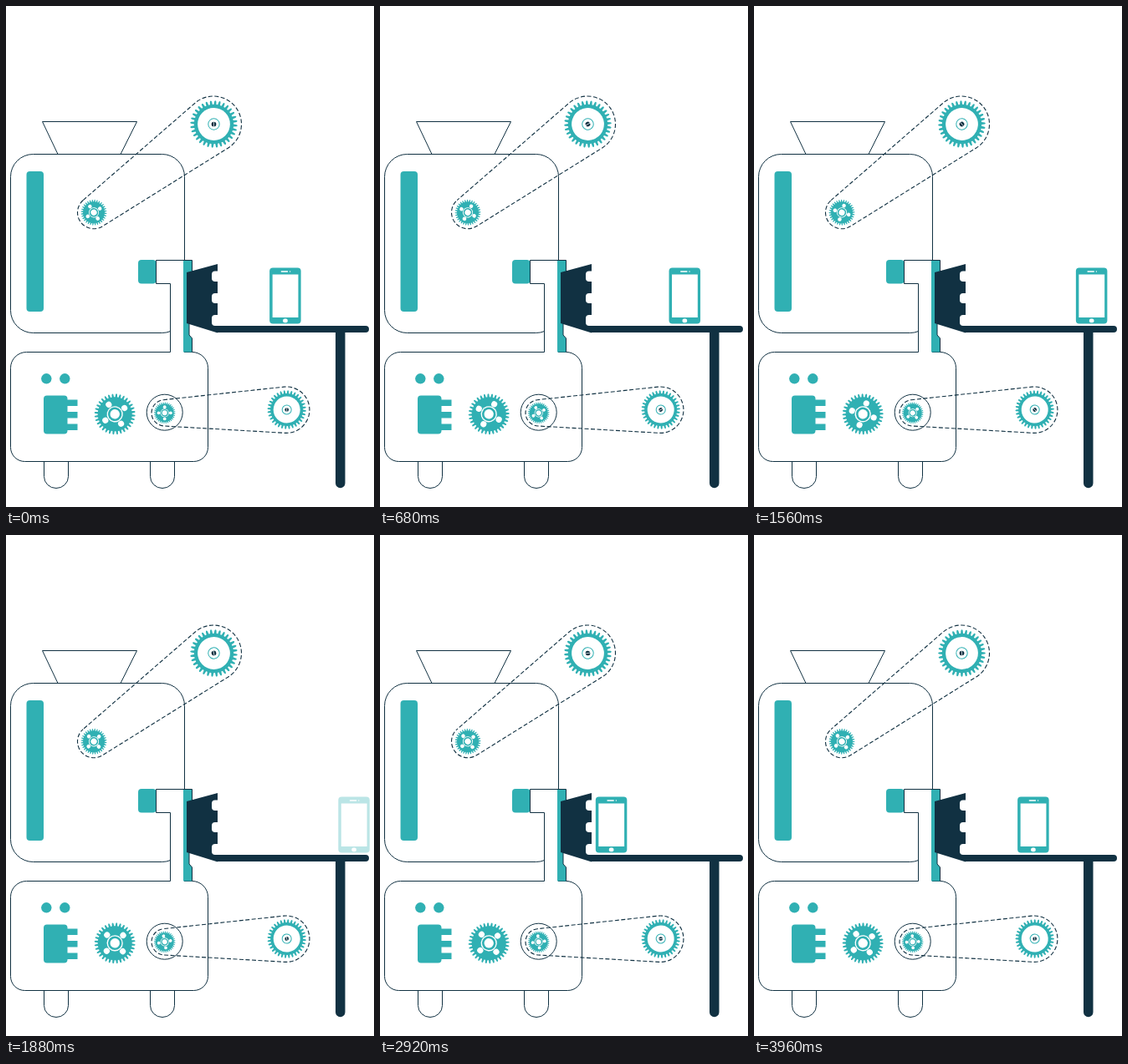
An HTML page for the animation above (4000 ms loop, 440 px wide and 600 px high).

```html
<!DOCTYPE html>
<html lang="en">
<head>
<meta charset="utf-8">
<title>Phone machine</title>
<style>
  html, body { margin: 0; width: 100%; height: 100%; overflow: hidden; background: #fff; }
  svg { display: block; width: 100vw; height: 100vh; }
  .line { fill: #fff; stroke: #113142; stroke-width: 1; }
  .teal { fill: #30b0b3; }
  .navy { fill: #113142; }
  .white { fill: #fff; }
  .belt { fill: none; stroke: #113142; stroke-width: 1.1; stroke-dasharray: 5 2.5; }
  .paper { fill: #fff; stroke: #000; stroke-width: 1.2; }
</style>
</head>
<body>
<svg viewBox="0 0 440 600">
  <defs>
    <clipPath id="exit"><rect x="246" y="300" width="194" height="90"/></clipPath>
    <g id="sheet" class="paper">
      <rect x="-18.5" y="-23.5" width="37" height="47"/>
      <path d="M-13 -17H13M-13 -11.3H13M-13 -5.7H13M-13 0H13M-13 5.5H0"/>
    </g>
  </defs>

  <use id="sheetA" href="#sheet"/>
  <use id="sheetB" href="#sheet"/>

  <path class="line" d="M43.5 138.5H156.5L137 177.5H62Z"/>
  <rect class="line" x="5.5" y="177.5" width="208" height="214" rx="27"/>
  <rect class="teal" x="24.5" y="198" width="20.5" height="168" rx="4"/>

  <path class="line" d="M45.5 545V563.5a14.5 14 0 0 0 29 0V545"/>
  <path class="line" d="M172.5 545V563.5a14.5 14 0 0 0 29 0V545"/>
  <path class="line" d="M24.5 414.5H222.5a19 19 0 0 1 19 19V528.5a17 17 0 0 1 -17 17H22.5a17 17 0 0 1 -17 -17V433.5a19 19 0 0 1 19 -19Z"/>
  <circle class="teal" cx="48.3" cy="446.3" r="6.2"/>
  <circle class="teal" cx="70.3" cy="446.3" r="6.2"/>
  <rect class="teal" x="45" y="466.5" width="28.5" height="46" rx="4"/>
  <path class="teal" d="M72 471.5H85.5V479H72ZM72 486H85.5V493.5H72ZM72 500.5H85.5V508H72Z"/>
  <circle class="line" cx="189.7" cy="486.7" r="21.5"/>

  <rect class="teal" x="158" y="304" width="21.5" height="28.5" rx="4"/>
  <path class="white" d="M179.5 304.5H213V416H196.5V332.5H179.5Z"/>
  <path class="teal" d="M212 304.5H222.5V378H219V394L222.5 398V414.5H212Z"/>
  <path class="line" style="fill:none" d="M196.5 414.5V332.5H179.5V304.5H222.5V378M219 378V394L222.5 398V414.5"/>

  <path class="navy" d="M245 383H430a4 4 0 0 1 0 8H405.5V571.5a5.75 5.75 0 0 1 -11.5 0V391H253Z"/>

  <g clip-path="url(#exit)">
    <g id="phone">
      <rect class="teal" y="313.5" width="37.5" height="67" rx="4"/>
      <rect class="white" x="3.5" y="321.5" width="30.8" height="51.5"/>
      <rect class="white" x="13.5" y="317.2" width="8.6" height="1.5" rx=".7"/>
      <circle class="white" cx="24.5" cy="318" r=".7"/>
      <rect class="white" x="16" y="374.4" width="5.6" height="4.9" rx="2"/>
    </g>
  </g>
  <path class="navy" d="M216 319L253 309V317.5H250q-4 0 -4 4V326q0 4 4 4H253V344H250q-4 0 -4 4V352q0 4 4 4H253V370H250q-4 0 -4 4V379q0 4 4 4H253V391.5L216 380Z"/>

  <g id="gears"></g>
  <g id="belts"></g>
</svg>
<script>
const LOOP = 4000;
const $ = id => document.getElementById(id);
const phone = $('phone');
const rad = deg => deg * Math.PI / 180;
const polar = (r, a, x = 0, y = 0) =>
  (x + r * Math.cos(a)).toFixed(2) + ' ' + (y + r * Math.sin(a)).toFixed(2);

function teeth(r, count) {
  const step = 2 * Math.PI / count, root = r * 0.83;
  let d = '';
  for (let i = 0; i < count; i++) {
    const a = i * step;
    d += (i ? 'L' : 'M') + polar(root, a) +
      'L' + polar(r * 0.96, a + step * 0.12) +
      'Q' + polar(r * 1.03, a + step * 0.32) + ' ' + polar(r * 0.96, a + step * 0.52) +
      'L' + polar(root, a + step * 0.64);
  }
  return `<path class="teal" d="${d}Z"/>`;
}

const disc = (cls, r, x = 0, y = 0) => `<circle class="${cls}" cx="${x}" cy="${y}" r="${r}"/>`;

function wheel(r) {
  return teeth(r, 32) + disc('white', r * 0.68) +
    `<circle r="${r * 0.235}" fill="none" stroke="#30b0b3"/>` +
    disc('navy', r * 0.1) +
    `<path d="M0 ${-r * 0.1}V${r * 0.1}" stroke="#fff" stroke-width=".7"/>`;
}

function cog(r) {
  let s = teeth(r, 32);
  for (let i = 0; i < 4; i++) {
    const a = i * Math.PI / 2;
    s += disc('white', r * 0.145, r * 0.55 * Math.sin(a), -r * 0.55 * Math.cos(a));
  }
  return s + disc('white', r * 0.39) + disc('teal', r * 0.335) + disc('white', r * 0.23);
}

const gears = [
  { x: 248.5, y: 141.5, start: 0, art: wheel(28.5) },
  { x: 335.7, y: 483.5, start: 0, art: wheel(23.5) },
  { x: 130.2, y: 488.8, start: -33, art: cog(24.7) },
  { x: 105, y: 247.3, start: -33, art: cog(15.6) },
  { x: 189.7, y: 487.3, start: 0, art: cog(13) }
];
$('gears').innerHTML = gears.map(g => `<g>${g.art}</g>`).join('');
gears.forEach((g, i) => g.el = $('gears').children[i]);

// Closed belt around a small pulley and a larger one, clockwise.
function belt(x1, y1, r1, x2, y2, r2) {
  const a = Math.atan2(y2 - y1, x2 - x1);
  const b = Math.acos((r1 - r2) / Math.hypot(x2 - x1, y2 - y1));
  return `<path class="belt" d="M${polar(r1, a - b, x1, y1)}L${polar(r2, a - b, x2, y2)}` +
    `A${r2} ${r2} 0 1 1 ${polar(r2, a + b, x2, y2)}L${polar(r1, a + b, x1, y1)}` +
    `A${r1} ${r1} 0 0 1 ${polar(r1, a - b, x1, y1)}Z"/>`;
}
$('belts').innerHTML =
  belt(105, 247.3, 19.5, 248, 141.5, 33.5) + belt(189.7, 487.3, 15.7, 335.2, 483.7, 27.7);
const belts = [...$('belts').children];

function movePhone(t) {
  let x, alpha = 1;
  if (t < 1960) {
    x = 315.1 + 0.0447 * Math.min(t, 1840);
    alpha = Math.max(0, Math.min(1, (1920 - t) / 120));
  } else {
    x = 222.5 + 0.0551 * (t - 2280);
  }
  phone.setAttribute('transform', `translate(${Math.min(x, 397.3).toFixed(2)} 0)`);
  phone.setAttribute('opacity', alpha);
}

function drop(el, t, from, to, x, y, vx, vy, tilt) {
  const dt = t - 2280;
  el.setAttribute('visibility', t >= from && t < to ? 'visible' : 'hidden');
  el.setAttribute('transform', `translate(${x + vx * dt} ${y + vy * dt}) rotate(${tilt})`);
}

function draw(t) {
  for (const g of gears)
    g.el.setAttribute('transform', `translate(${g.x} ${g.y}) rotate(${g.start + 360 * t / LOOP})`);
  for (const b of belts) b.setAttribute('stroke-dashoffset', -210 * t / LOOP);
  movePhone(t);
  drop($('sheetA'), t, 2000, 2410, 69.8, 128.3, 0.014, 0.325, -14);
  drop($('sheetB'), t, 2200, 2570, 103, 61.5, 0, 0.35, 0);
}

function tick() {
  draw(performance.now() % LOOP);
  requestAnimationFrame(tick);
}
tick();
</script>
</body>
</html>
```
